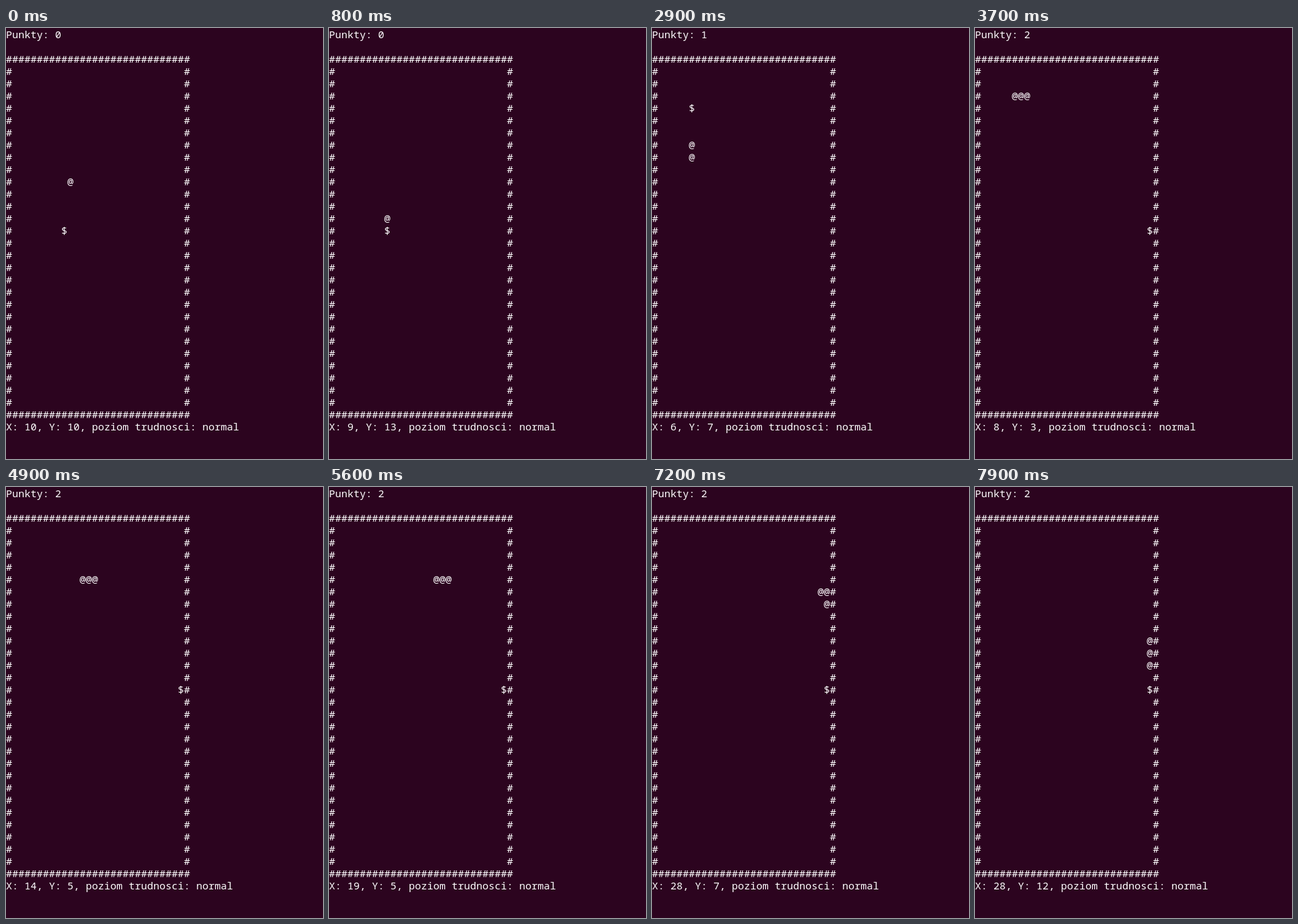
An HTML page for the animation above (8 s loop, 465 px wide and 633 px high).

```html
<!DOCTYPE html>
<html lang="pl">
<head>
<meta charset="utf-8">
<title>Snake</title>
<style>
  html, body { margin: 0; width: 100%; height: 100%; overflow: hidden; background: #2c041f; }
  pre { margin: 0; color: #fff; font: 15px/18px "Noto Sans Mono", "DejaVu Sans Mono", monospace; }
</style>
</head>
<body>
<pre id="screen"></pre>
<script>
const SIZE = 30, TICK = 100;
const DIRS = { U: [0, -1], D: [0, 1], L: [-1, 0], R: [1, 0] };
const FOOD = [[9, 14], [6, 4], [28, 14]];

// Moves made in each tick; "." is a pause
const MOVES = `
  . . D . D L . D . D
  D . D . . L LU . . U
  U . U U . LU U . U U
  . U . U U . UR R . D
  D R . R R R R . . R
  R . R R . R R . R R
  R . R . R R . R R D
  . RD . D D . D D . D`.trim().split(/\s+/);

const screen = document.getElementById("screen");

function play(ticks) {
  const snake = [[10, 10]];
  let score = 0;
  for (const key of MOVES.slice(0, ticks + 1).join("").replaceAll(".", "")) {
    const [x, y] = snake[0], [dx, dy] = DIRS[key];
    const head = [x + dx, y + dy];
    snake.unshift(head);
    if (String(head) === String(FOOD[score])) score++;
    else snake.pop();
  }
  return { snake, score };
}

function render({ snake, score }) {
  const wall = "#".repeat(SIZE);
  const grid = Array.from({ length: SIZE }, (_, y) =>
    [...(y % (SIZE - 1) ? "#" + " ".repeat(SIZE - 2) + "#" : wall)]);
  const put = ([x, y], char) => grid[y][x] = char;
  put(FOOD[score], "$");
  snake.forEach(cell => put(cell, "@"));
  const [x, y] = snake[0];
  return [`Punkty: ${score}`, "", ...grid.map(row => row.join("")),
    `X: ${x}, Y: ${y}, poziom trudnosci: normal`].join("\n");
}

let shown = -1;
function draw() {
  const tick = Math.floor(performance.now() / TICK) % MOVES.length;
  if (tick !== shown) screen.textContent = render(play(shown = tick));
  requestAnimationFrame(draw);
}
draw();
</script>
</body>
</html>
```
